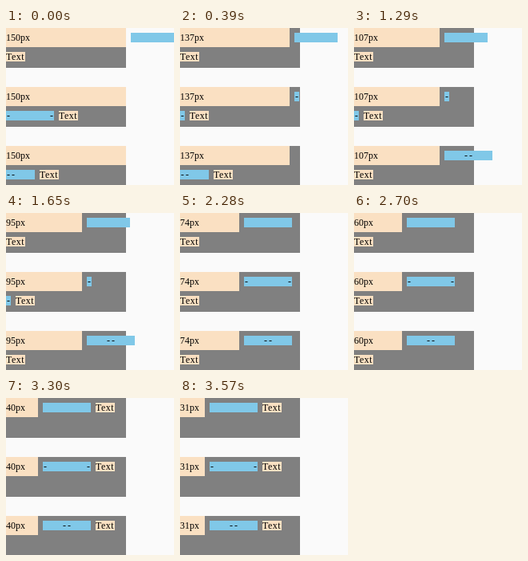
These frames come from a looping animation (210 by 197 pixels, 3.6 s). An HTML page:

```html
<!DOCTYPE html>
<html lang="en">
<head>
<meta charset="utf-8">
<title>Line wrapping</title>
<style>
html, body { margin: 0; width: 100%; height: 100%; overflow: hidden; background: #fafafa; }
body { position: relative; font: 12px/12px "Liberation Serif", "Times New Roman", serif; color: #000; }
.box { position: absolute; left: 0; width: 150px; height: 50px; background: #808080; }
.box > * { position: absolute; left: 0; top: 0; white-space: pre; }
.block { height: 24px; line-height: 24px; background: #fae0c2; }
.bar { height: 12px; background: #80c8e8; text-indent: 1px; }
.word { width: 24px; height: 12px; background: #fae0c2; letter-spacing: .5px; }
</style>
</head>
<body>
<script>
const BOX = 150, GAP = 6, STEP = 30, STEPS = 120;

// Each layout returns bars as [x, line, width, text offset].
const layouts = [
  w => [[w + GAP, 0, w + 66 <= BOX ? 60 : 54, 0]],
  w => {
    const first = w + 12 <= BOX, both = w + 66 <= BOX;
    const x = first ? w + GAP : 0;
    return [
      [x, first ? 0 : 1, first === both ? 60 : 6, 0],
      [first === both ? x + 54 : 0, both ? 0 : 1, 6, 0]
    ];
  },
  w => {
    const first = w + 36 <= BOX, both = w + 42 <= BOX;
    return [
      first ? [w + GAP, 0, 30, 24] : [0, 1, 6, 0],
      both ? [w + 36, 0, 30, 0] : [first ? 0 : 6, 1, 30, 0]
    ];
  }
];

function add(parent, cls, text = "") {
  const el = document.createElement("div");
  el.className = cls;
  el.textContent = text;
  return parent.appendChild(el);
}

function place(el, x, line) {
  el.style.left = x + "px";
  el.style.top = 6 + line * 24 + "px";
}

const rows = layouts.map((layout, i) => {
  const box = add(document.body, "box");
  box.style.top = i * 74 + "px";
  return {
    layout,
    block: add(box, "block"),
    bars: layout(BOX).map(() => add(box, "bar", i ? "-" : "")),
    word: add(box, "word", "Text")
  };
});

function draw(w) {
  for (const { layout, block, bars, word } of rows) {
    block.style.width = w + "px";
    block.textContent = w + "px";
    let end = 0;
    layout(w).forEach(([x, line, width, offset], i) => {
      place(bars[i], x, line);
      bars[i].style.width = width + "px";
      bars[i].style.textIndent = offset + 1 + "px";
      if (line) end = Math.max(end, x + width + GAP);
    });
    if (w + 96 <= BOX) place(word, w + 72, 0);
    else place(word, end, 1);
  }
}

const start = performance.now();
function tick() {
  const t = Math.max(0, performance.now() - start);
  draw(BOX - Math.floor(t / STEP) % STEPS);
  requestAnimationFrame(tick);
}
tick();
</script>
</body>
</html>
```
